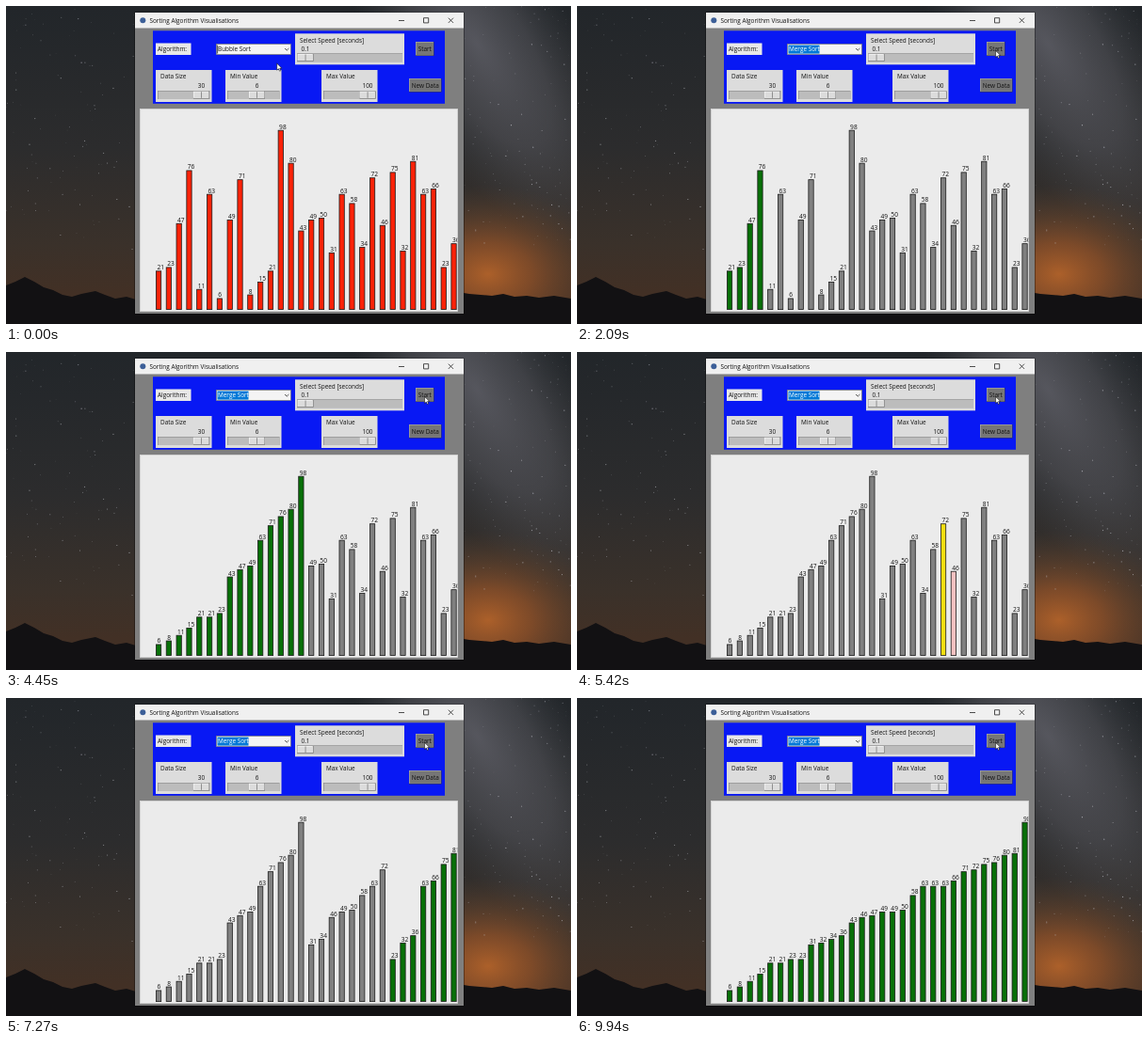
Write an HTML page that moves like this. It is 600x338 px and loops after 9970 ms.

```html
<!DOCTYPE html>
<html lang="en">
<head>
<meta charset="utf-8">
<title>Sorting Algorithm Visualisations</title>
<style>
html, body { margin: 0; width: 100%; height: 100%; overflow: hidden; background: #111; }
svg { display: block; width: 600px; height: 338px; }
text { font: 6.4px "Open Sans", "Noto Sans", sans-serif; fill: #111; }
#bars text { font-size: 6.6px; }
#bars rect { stroke: #1c1c1c; stroke-width: .8; }
</style>
</head>
<body>
<svg viewBox="0 0 600 338" xmlns="http://www.w3.org/2000/svg">
  <defs>
    <linearGradient id="sky" x1="0" y1="0" x2="0" y2="1">
      <stop offset="0" stop-color="#22262a"/>
      <stop offset=".45" stop-color="#2c2c2d"/>
      <stop offset=".75" stop-color="#3a312a"/>
      <stop offset=".9" stop-color="#423025"/>
    </linearGradient>
    <radialGradient id="glow">
      <stop offset="0" stop-color="#ac602a"/>
      <stop offset=".35" stop-color="#8c5029" stop-opacity=".8"/>
      <stop offset="1" stop-color="#56402f" stop-opacity="0"/>
    </radialGradient>
    <radialGradient id="haze">
      <stop offset="0" stop-color="#62626a" stop-opacity=".8"/>
      <stop offset=".5" stop-color="#56565c" stop-opacity=".55"/>
      <stop offset="1" stop-color="#44464a" stop-opacity="0"/>
    </radialGradient>
    <clipPath id="plot"><rect x="143" y="110" width="336.300" height="214"/></clipPath>
  </defs>

  <rect width="600" height="338" fill="url(#sky)"/>
  <ellipse cx="500" cy="40" rx="100" ry="250" fill="url(#haze)" transform="rotate(-32 500 40)"/>
  <ellipse cx="512" cy="285" rx="135" ry="95" fill="url(#glow)"/>
  <g id="stars"></g>
  <path fill="#121113" d="M0 297L10 293L20 288L30 293L40 299L50 302L60 307L70 309L80 306L95 303L105 307L116 311L128 309L138 312V326H480V304L492 306L504 307L516 308L528 306L540 309L553 308L566 310L582 308L600 311V338H0Z"/>

  <rect x="136" y="6.500" width="351" height="321" fill="#000" opacity=".35"/>
  <rect x="137" y="7" width="349" height="320" fill="#7f7f7f"/>
  <rect x="137" y="7" width="349" height="16.500" fill="#f0f0f0"/>
  <circle cx="145.300" cy="15.200" r="3" fill="#3c5f98"/>
  <text x="152.500" y="17.600">Sorting Algorithm Visualisations</text>
  <path d="M417 15.500H423M443.500 12.700H448.700V17.900H443.500ZM469.800 12.700L475 17.900M475 12.700L469.800 17.900" fill="none" stroke="#222" stroke-width=".8"/>

  <rect x="156" y="26.300" width="310" height="77.500" fill="#0818f4"/>
  <g id="ui"></g>

  <rect x="223.400" y="40.400" width="79" height="11.200" fill="#f4f4f4" stroke="#777" stroke-width=".7"/>
  <rect id="mark" x="224.500" y="41.600" width="33" height="9" fill="#0078d7"/>
  <path id="caret" d="M224.600 41.600V50.500" stroke="#111" stroke-width=".7"/>
  <text id="choice" x="225" y="48.400"></text>
  <path d="M296 45L298.200 47.200L300.400 45" fill="none" stroke="#333" stroke-width=".8"/>

  <rect x="142.500" y="109.500" width="337" height="215" fill="#ebebeb" stroke="#d8d8d8" stroke-width=".8"/>
  <g id="bars" clip-path="url(#plot)"></g>
  <path id="cursor" d="M0 0V7.200L1.700 5.700L2.900 8.200L4.100 7.600L3 5.200H5.200Z" fill="#fff" stroke="#111" stroke-width=".6"/>
</svg>
<script>
const LOOP = 9970, SORT_START = 1470, STEP = 108.5, PICK = 750;
const GREY = "#808080", GREEN = "#087008", YELLOW = "#f4de10", PINK = "#f4c0c0", RED = "#fb2208";
const PANEL = "#dcdcdc", BUTTON = "#767676";
const data = [21, 23, 47, 76, 11, 63, 6, 49, 71, 8, 15, 21, 98, 80, 43,
  49, 50, 31, 63, 58, 34, 72, 46, 75, 32, 81, 63, 66, 23, 36];

const $ = id => document.getElementById(id);
function add(parent, tag, attrs, text) {
  const el = document.createElementNS("http://www.w3.org/2000/svg", tag);
  for (const k in attrs) el.setAttribute(k, attrs[k]);
  if (text) el.textContent = text;
  return parent.appendChild(el);
}
function box(x, y, w, h, fill) {
  return add($("ui"), "rect", { x, y, width: w, height: h, fill });
}
function raised(x, y, w, h, fill, light, dark) {
  box(x, y, w, h, dark);
  box(x, y, w - .7, h - .7, light);
  box(x + .7, y + .7, w - 1.4, h - 1.4, fill);
}
function label(x, y, text, anchor = "start") {
  add($("ui"), "text", { x, y, "text-anchor": anchor }, text);
}
function scale(x, y, w, h, name, value, knob) {
  box(x, y, w, h, PANEL);
  label(x + 5, y + 9.4, name);
  label(knob + 8.5, y + 19, value, "middle");
  const top = y + h - 12;
  box(x + 2, top, w - 4, 9, "#8a8a8a");
  box(x + 2.6, top + .6, w - 4.6, 8.4, "#bcbcbc");
  raised(knob, top + .7, 17, 7.8, PANEL, "#f4f4f4", "#6c6c6c");
  box(knob + 8.2, top + 1.2, .7, 6.6, "#6c6c6c");
}
function button(x, y, w, h, text) {
  raised(x, y, w, h, BUTTON, "#a8a8a8", "#3c3c3c");
  label(x + w / 2, y + h / 2 + 2.4, text, "middle");
}

box(159, 39.5, 37.5, 12.5, "#e8e8e8");
label(161, 48.3, "Algorithm:");
scale(307, 29.3, 116, 33, "Select Speed [seconds]", "0.1", 309.5);
scale(159, 68, 59.5, 34, "Data Size", "30", 199);
scale(233, 68, 59.5, 34, "Min Value", "6", 258);
scale(335, 68, 59.5, 34, "Max Value", "100", 375.5);
button(435, 38, 19.5, 15, "Start");
button(428, 77, 34.5, 14.5, "New Data");

let seed = 7;
const rnd = () => (seed = seed * 16807 % 2147483647) / 2147483647;
for (let i = 0; i < 220; i++) {
  const x = rnd() < .5 ? rnd() * 136 : 487 + rnd() * 113;
  add($("stars"), "circle", {
    cx: x, cy: rnd() * 260, r: .25 + rnd() * .4, fill: "#c4c6ce", opacity: .25 + rnd() * .5
  });
}

// Every merge is drawn twice: both halves coloured, then the sorted range.
const steps = [];
function mergeSort(a, left, right) {
  if (left >= right) return;
  const mid = (left + right) >> 1;
  mergeSort(a, left, mid);
  mergeSort(a, mid + 1, right);
  const snap = paint => steps.push({
    values: a.slice(),
    colors: a.map((_, i) => i < left || i > right ? GREY : paint(i))
  });
  snap(i => i <= mid ? YELLOW : PINK);
  const part = a.slice(left, right + 1).sort((p, q) => p - q);
  a.splice(left, part.length, ...part);
  snap(() => GREEN);
}
mergeSort(data.slice(), 0, data.length - 1);
const idle = { values: data, colors: data.map(() => RED) };

const bars = data.map((_, i) => {
  const x = 159.4 + i * 10.81;
  return {
    rect: add($("bars"), "rect", { x, width: 5.3 }),
    text: add($("bars"), "text", { x: x + 1 })
  };
});

const path = [[0, 287.7, 61], [120, 287.7, 61], [400, 297, 46], [800, 297, 46], [1300, 444.6, 47.4], [LOOP, 444.6, 47.4]];
function cursorAt(t) {
  const n = path.findIndex(p => p[0] > t);
  const a = path[n - 1], b = path[n];
  const u = (t - a[0]) / (b[0] - a[0]), e = u * u * (3 - 2 * u);
  return [a[1] + (b[1] - a[1]) * e, a[2] + (b[2] - a[2]) * e];
}

let shown;
function render(t) {
  const k = Math.min(Math.floor((t - SORT_START) / STEP), steps.length - 1);
  const state = k < 0 ? idle : steps[k];
  if (state !== shown) {
    shown = state;
    bars.forEach(({ rect, text }, i) => {
      const v = state.values[i], h = v * 190.4 / 98, y = 322.6 - h;
      rect.setAttribute("y", y);
      rect.setAttribute("height", h);
      rect.setAttribute("fill", state.colors[i]);
      text.setAttribute("y", y - 1.5);
      text.textContent = v;
    });
  }
  const picked = t >= PICK;
  $("choice").textContent = picked ? "Merge Sort" : "Bubble Sort";
  $("choice").style.fill = picked ? "#fff" : "#111";
  $("mark").setAttribute("visibility", picked ? "visible" : "hidden");
  $("caret").setAttribute("visibility", picked ? "hidden" : "visible");
  $("cursor").setAttribute("transform", `translate(${cursorAt(t)})`);
}

const begin = performance.now();
function frame() {
  render((performance.now() - begin) % LOOP);
  requestAnimationFrame(frame);
}
frame();
</script>
</body>
</html>
```
